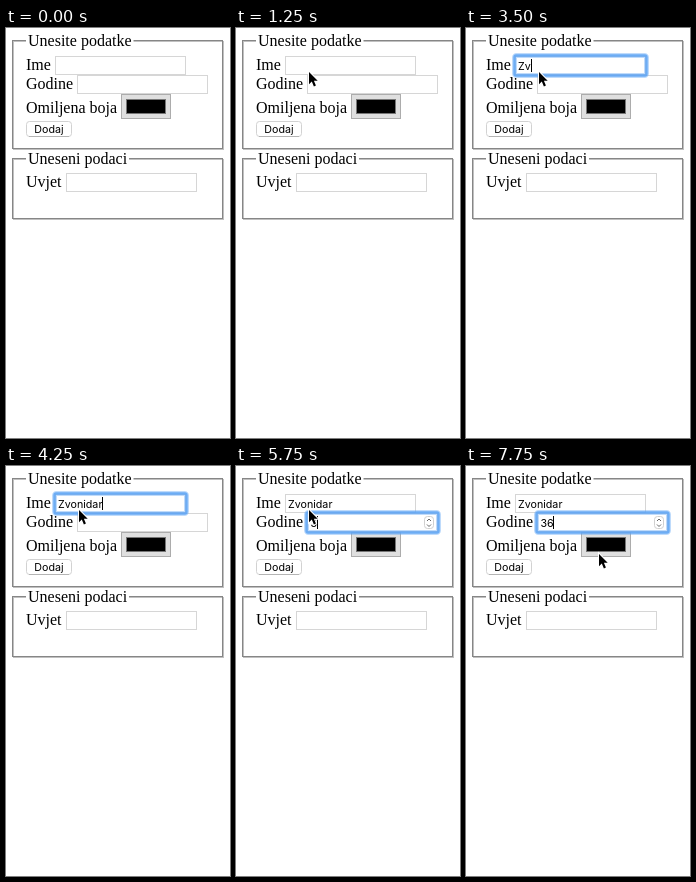
An HTML page that plays this animation: 224x410 px, repeating every 8000 ms.

```html
<!DOCTYPE html>
<html lang="hr">
<head>
<meta charset="utf-8">
<title>Unos podataka</title>
<style>
  html, body { margin: 0; width: 100%; height: 100%; overflow: hidden; background: #fff; }
  svg { display: block; }
  text { font: 16px "Liberation Serif", Times, serif; }
  .ui { font: 10.7px Inter, "Liberation Sans", sans-serif; }
  .field { fill: #fff; stroke: #d6d6d6; }
  .dark { fill: none; stroke: #868686; }
  .light { fill: none; stroke: #c0c0c0; }
  .ring rect { fill: none; stroke: #5fa5f5; }
  .ring .glow { stroke-width: 5; opacity: .4; }
  .ring .core { stroke-width: 2.4; opacity: .85; }
  .caret { fill: #000; }
</style>
</head>
<body>
<svg width="224" height="410" viewBox="0 0 224 410">
  <rect class="light" x="7.5" y="13.5" width="210" height="108"/>
  <rect class="dark" x="6.5" y="12.5" width="210" height="108"/>
  <rect class="light" x="7.5" y="131.5" width="210" height="60"/>
  <rect class="dark" x="6.5" y="130.5" width="210" height="60"/>
  <path fill="#fff" d="M20 4h107.5v18H20zM20 122h103v18H20z"/>
  <text x="22" y="18">Unesite podatke</text>
  <text x="22" y="136">Uneseni podaci</text>

  <text x="20" y="42">Ime</text>
  <text x="20" y="61">Godine</text>
  <text x="20" y="85">Omiljena boja</text>
  <text x="20" y="159">Uvjet</text>
  <rect class="field" x="49.5" y="28.5" width="130" height="18"/>
  <rect class="field" x="71.5" y="47.5" width="130" height="18"/>
  <rect class="field" x="60.5" y="145.5" width="130" height="18"/>

  <rect x="115.5" y="66.5" width="49" height="24" fill="#dfdfdf" stroke="#acacac"/>
  <rect x="120.5" y="71.5" width="39" height="14" stroke="#777"/>

  <rect x="20.5" y="93.5" width="45" height="15" rx="3" fill="#fff" stroke="#d2d2d2"/>
  <path d="M23 108.5h40" stroke="#b4b4b4"/>
  <text class="ui" x="43" y="105" text-anchor="middle">Dodaj</text>

  <g id="nameRing" class="ring">
    <rect class="glow" x="48.5" y="27.5" width="132" height="20" rx="2"/>
    <rect class="core" x="48.5" y="27.5" width="132" height="20" rx="1.5"/>
  </g>
  <g id="ageRing" class="ring">
    <rect class="glow" x="70.5" y="46.5" width="132" height="20" rx="2"/>
    <rect class="core" x="70.5" y="46.5" width="132" height="20" rx="1.5"/>
    <g fill="none">
      <rect x="188.5" y="50.5" width="9" height="12" rx="3" style="stroke:#d0d0d0"/>
      <path d="M191 55l2-2 2 2M191 58.5l2 2 2-2" stroke="#666"/>
    </g>
  </g>

  <text id="name" class="ui" x="52" y="41.5"></text>
  <text id="age" class="ui" x="74.5" y="60.7"></text>
  <rect id="nameCaret" class="caret" y="31" width="1" height="13"/>
  <rect id="ageCaret" class="caret" y="50" width="1" height="13"/>

  <path id="pointer" d="M0 0V12.2L2.8 9.6L4.9 14.5L6.9 13.6L4.9 8.8H8.7Z"
        stroke="#fff" stroke-width="2" paint-order="stroke"/>
</svg>
<script>
  const LOOP = 8000;
  const NAME = "Zvonidar", AGE = "36";

  // Each step list holds [start ms, value...]
  const pointerSteps = [[0, -30, -30], [250, 47, -1], [500, 37, 41], [750, 61, 42],
    [1000, 73, 39], [1250, 73, 44], [7250, 103.5, 43], [7500, 128, 94], [7750, 133, 88]];
  const focusSteps = [[0, ""], [2250, "name"], [4750, "age"]];
  const nameSteps = [[0, 0], [3250, 1], [3500, 2], [3750, 4], [4000, 6], [4250, 8]];
  const ageSteps = [[0, 0], [5750, 1], [6750, 2]];
  const blinkSteps = [[0, 0], [2250, 1], [2750, 0], [3250, 1], [5250, 0], [5750, 1],
    [6250, 0], [6750, 1], [7250, 0], [7750, 1]];

  const el = id => document.getElementById(id);
  const at = (steps, t) => steps.filter(s => s[0] <= t).pop().slice(1);
  const show = (id, on) => el(id).setAttribute("visibility", on ? "visible" : "hidden");

  function field(id, left, value, focused, caretOn) {
    const text = el(id);
    if (text.textContent !== value) text.textContent = value;
    const width = value ? text.getComputedTextLength() : 0;
    el(id + "Caret").setAttribute("x", Math.round(left + width));
    show(id + "Ring", focused);
    show(id + "Caret", focused && caretOn);
  }

  function draw() {
    const t = performance.now() % LOOP;
    const [focus] = at(focusSteps, t), [blink] = at(blinkSteps, t);
    field("name", 52, NAME.slice(0, at(nameSteps, t)[0]), focus === "name", blink);
    field("age", 74, AGE.slice(0, at(ageSteps, t)[0]), focus === "age", blink);
    el("pointer").setAttribute("transform", `translate(${at(pointerSteps, t)})`);
    requestAnimationFrame(draw);
  }
  draw();
</script>
</body>
</html>
```
